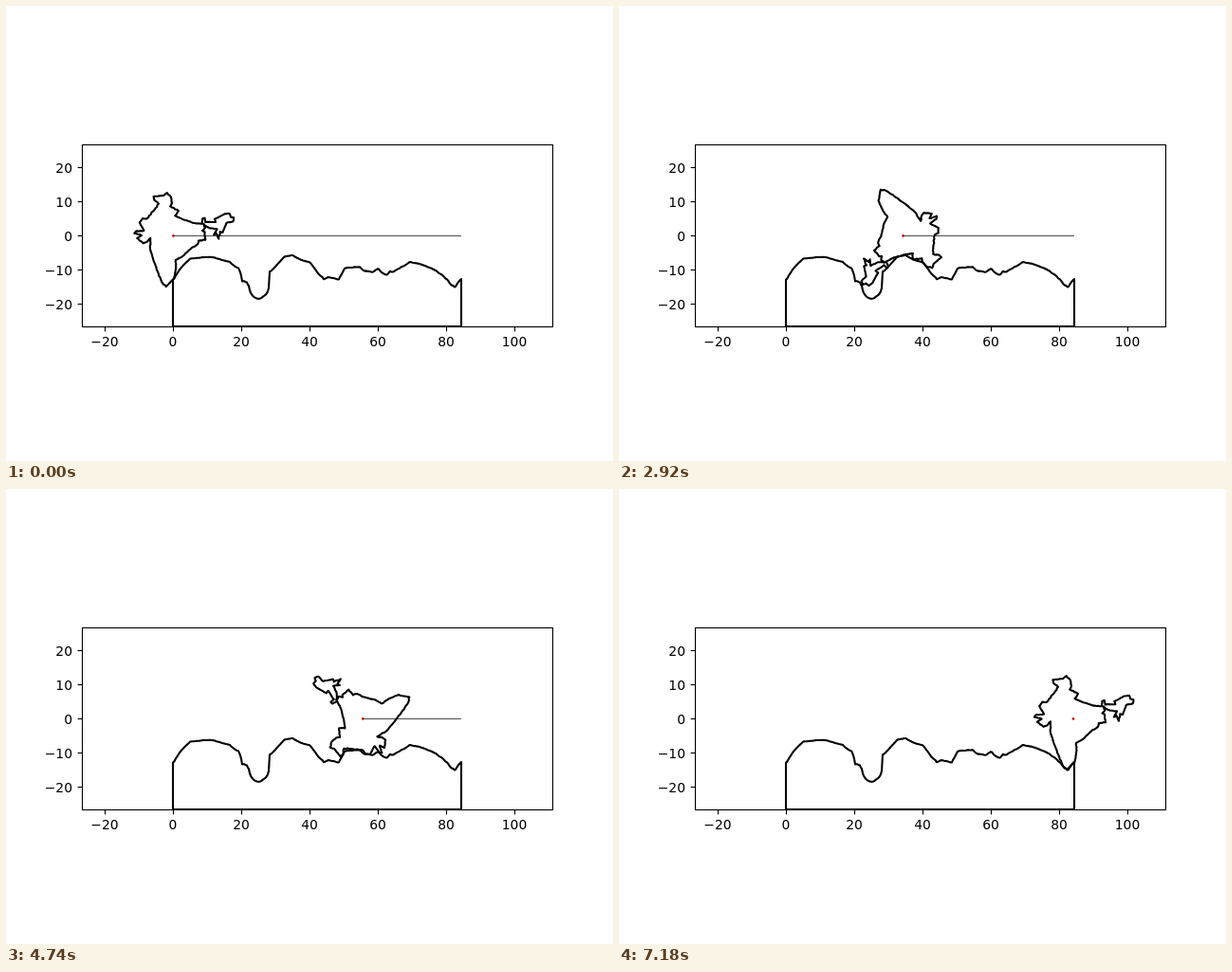
An HTML page for the animation above (7.2 s loop, 640 by 480 pixels).

```html
<!DOCTYPE html>
<html lang="en">
<head>
<meta charset="utf-8">
<title>Rolling outline</title>
<style>
  html, body { margin: 0; width: 100%; height: 100%; overflow: hidden; background: #fff; }
  svg { display: block; width: 640px; height: 480px; }
  text { font: 13.89px "DejaVu Sans", sans-serif; }
  .curve { fill: none; stroke: #000; stroke-width: 2.1; stroke-linejoin: round; }
  .axis { fill: none; stroke: #000; stroke-width: 1.11; }
</style>
</head>
<body>
<svg viewBox="0 0 640 480">
  <clipPath id="plot"><rect x="80" y="146" width="497" height="193"/></clipPath>
  <g clip-path="url(#plot)">
    <path id="road" class="curve"/>
    <path id="wheel" class="curve"/>
    <circle id="hub" r="1.3" cy="242.4" fill="#f00"/>
    <path id="track" stroke="#000" stroke-width="0.7"/>
  </g>
  <g id="axes"><rect class="axis" x="80.5" y="146.5" width="496" height="192"/></g>
</svg>
<script>
const SCALE = 3.6, ORIGIN = { x: 176.4, y: 242.4 }, END_X = 479.9;
const FLOOR = 338, LEFT = 176, RIGHT = 480;
const STEP_MS = 20, STEPS = 360;
const CENTER = { x: 79.6, y: 22.9 };

// Main corners of the wheel in degrees, clockwise from the top.
const corners = `77.8,35.5 78.9,34.3 79.2,32.5 78.7,31.5 81.1,30.2 80.1,28.8 82,27.9 85.3,26.7
  88,26.4 88.1,27.9 88.8,28.1 89,26.9 92,26.9 91.7,27.8 94.6,29.3 96.1,29.4 96.4,28.4 97.3,28.2
  97.1,27.1 95.1,26.6 94.1,23.9 93.3,24.1 92.9,22 92.2,23.6 91.5,23.2 92.4,24.9 89.9,25.3
  88.5,26.4 88.9,25.2 88.1,24.4 88.8,24 89,21.7 87,21.5 86.8,20.5 85.1,19.5 82.2,16.8 80.3,15.8
  80.3,13.1 79.8,10.3 78.9,9.5 77.5,8 76.5,8.9 74.7,13 72.8,19.2 72.9,22.2 72.2,21.4 70.8,20.7
  69,22.2 70.3,23 68.2,23.6 68.8,24.3 71,24.4 69.7,26.8 70.6,28 71.8,27.9 74.4,31 75.3,32.3
  74,33.4 73.8,34.4 76.8,34.7`;

const $ = id => document.getElementById(id);
const toPath = points => "M" + points.map(([x, y]) => `${x.toFixed(2)} ${y.toFixed(2)}`).join("L");

// Splits each edge into short pieces with a slight seeded wobble.
function roughen(points, piece, amount) {
  let seed = 7;
  const wobble = () => {
    seed = (seed * 16807) % 2147483647;
    return (seed / 2147483647 * 2 - 1) * amount;
  };
  return points.flatMap(([x, y], i) => {
    const [nx, ny] = points[(i + 1) % points.length];
    const count = Math.ceil(Math.hypot(nx - x, ny - y) / piece);
    return Array.from({ length: count }, (_, k) => {
      const u = k / count;
      return k ? [x + (nx - x) * u + wobble(), y + (ny - y) * u + wobble()] : [x, y];
    });
  });
}

const hubX = step => ORIGIN.x + (END_X - ORIGIN.x) * step / STEPS;
const turn = step => step * 2 * Math.PI / STEPS;

function place(points, step) {
  const c = Math.cos(turn(step)), s = Math.sin(turn(step));
  return points.map(([x, y]) => [hubX(step) + x * c - y * s, ORIGIN.y + x * s + y * c]);
}

// The road is the ground left over once the wheel has swept through it:
// per pixel column, the lowest point that any pose reaches.
function sweepRoad(points) {
  const depth = new Array(RIGHT - LEFT + 1).fill(0);
  for (let step = 0; step < STEPS; step++) {
    const pose = place(points, step);
    pose.forEach(([ax, ay], i) => {
      const [bx, by] = pose[(i + 1) % pose.length];
      const first = Math.max(LEFT, Math.ceil(Math.min(ax, bx)));
      const last = Math.min(RIGHT, Math.floor(Math.max(ax, bx)));
      for (let x = first; x <= last && ax !== bx; x++) {
        const y = ay + (by - ay) * (x - ax) / (bx - ax);
        depth[x - LEFT] = Math.max(depth[x - LEFT], y);
      }
    });
  }
  return depth.map((y, i) => [LEFT + i, y]);
}

function add(name, attributes, text = "") {
  const node = document.createElementNS("http://www.w3.org/2000/svg", name);
  for (const key in attributes) node.setAttribute(key, attributes[key]);
  node.textContent = text;
  $("axes").append(node);
}

const label = v => String(v).replace("-", "\u2212");

for (let v = -20; v <= 100; v += 20) {
  const x = Math.floor(ORIGIN.x + v * SCALE) + 0.5;
  add("path", { class: "axis", d: `M${x} 338.5v4.9` });
  add("text", { x: x - 0.5, y: 359, "text-anchor": "middle" }, label(v));
}
for (let v = -20; v <= 20; v += 10) {
  const y = Math.floor(ORIGIN.y - v * SCALE) + 0.5;
  add("path", { class: "axis", d: `M80.5 ${y}h-4.9` });
  add("text", { x: 70, y: y + 5.5, "text-anchor": "end" }, label(v));
}

const rim = corners.trim().split(/\s+/).map(pair => {
  const [x, y] = pair.split(",");
  return [(x - CENTER.x) * SCALE, (CENTER.y - y) * SCALE];
});
const outline = roughen(rim, 2.4, 0.4);
$("wheel").setAttribute("d", toPath(outline) + "Z");
$("road").setAttribute("d", toPath(sweepRoad(outline)) + `V${FLOOR}H${LEFT}Z`);

function draw(time) {
  const step = Math.floor(time / STEP_MS) % STEPS;
  const x = hubX(step);
  $("wheel").setAttribute("transform", `translate(${x} ${ORIGIN.y}) rotate(${step * 360 / STEPS})`);
  $("hub").setAttribute("cx", x);
  $("track").setAttribute("d", `M${x} 242.5H${END_X}`);
}

const start = performance.now();
function tick() {
  draw(performance.now() - start);
  requestAnimationFrame(tick);
}
tick();
</script>
</body>
</html>
```
